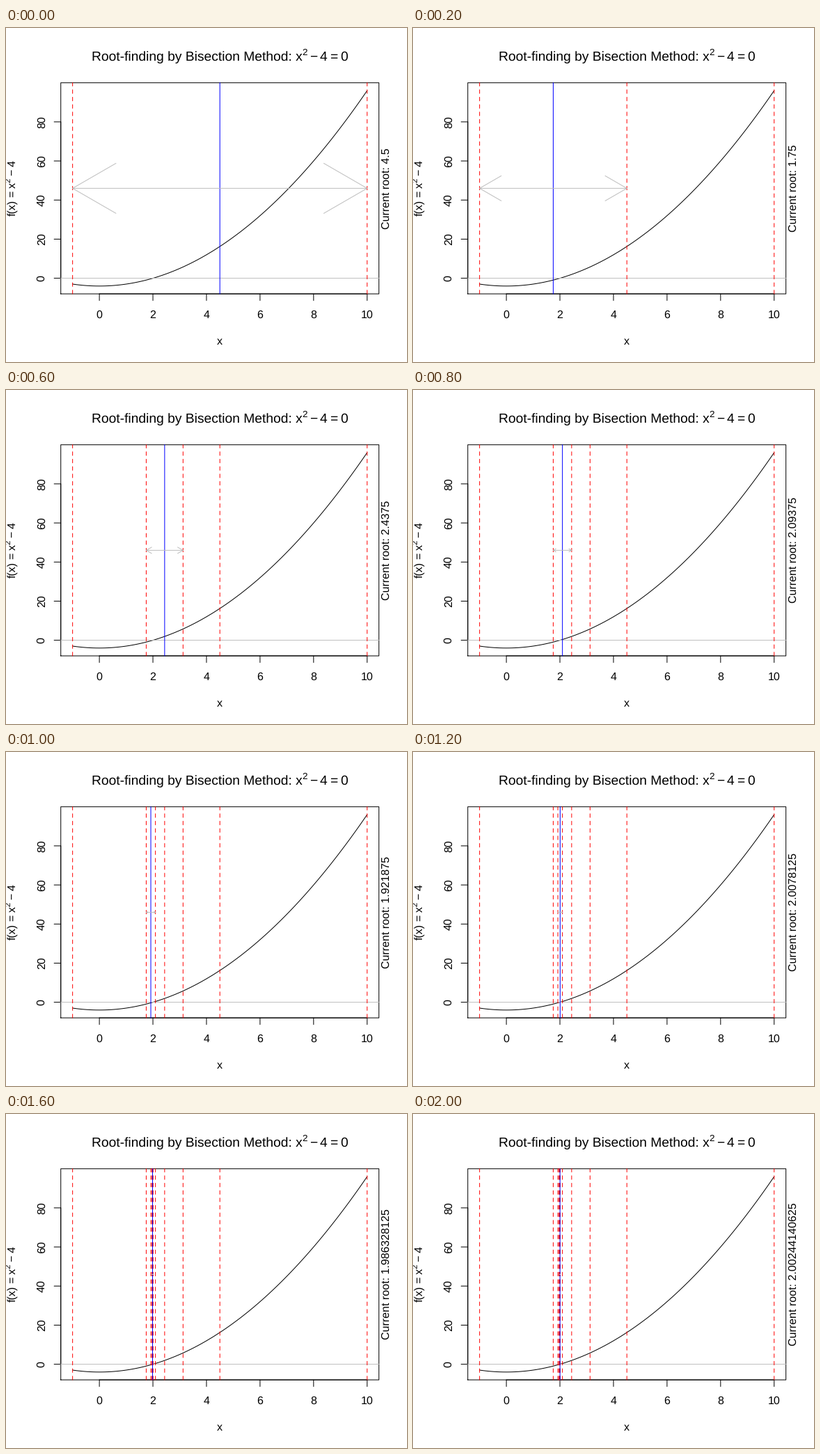
A matplotlib script that plays this animation: 576x480 px, repeating every 2200 ms.

```python
import numpy as np
import matplotlib.pyplot as plt
from matplotlib.animation import FuncAnimation
from matplotlib.collections import LineCollection

plt.rcParams["font.family"] = "Liberation Sans"
plt.rcParams["text.hinting"] = "no_hinting"

W, H, DPI = 576, 480, 96
PT = 72 / DPI                      # points per pixel
LINE = 19.2                        # height of one margin line
LEFT, RIGHT = 4.1 * LINE, W - 2.1 * LINE
TOP, BOTTOM = 4.1 * LINE, H - 5.1 * LINE
MID_X, MID_Y = (LEFT + RIGHT) / 2, (TOP + BOTTOM) / 2
FONT = 16
GRAY = "#BEBEBE"
LO, HI, STEPS = -1.0, 10.0, 11

fig = plt.figure(figsize=(W / DPI, H / DPI), dpi=DPI, facecolor="white")
ax = fig.add_axes([0, 0, 1, 1])
ax.set_xlim(0, W)
ax.set_ylim(H, 0)
ax.axis("off")


def f(x):
    return x ** 2 - 4


def px(x):
    return LEFT + (x + 1.44) * (RIGHT - LEFT) / 11.88


def py(y):
    return BOTTOM - (y + 8) * (BOTTOM - TOP) / 108


def stroke(xs, ys, color="black", z=2):
    line, = ax.plot(xs, ys, color=color, lw=PT, zorder=z, snap=False,
                    solid_capstyle="round", solid_joinstyle="round")
    return line


def write(x, y, s, size=FONT, angle=0):
    return ax.text(x, y, s, fontsize=size * PT, rotation=angle, ha="left",
                   va="baseline", rotation_mode="anchor", zorder=6)


def number_width(s):
    """Advance of a number in em."""
    return sum(0.278 if c == "." else 0.556 for c in s)


def formula(runs, size, base, upright):
    """Centre runs of (text, advance in em, gap before in px)."""
    total = sum(adv * size + gap for _, adv, gap in runs)
    pos = -total / 2
    for s, adv, gap in runs:
        pos += gap
        raised = s == "2"
        lift = 0.42 * size if raised else 0
        glyph = size * 0.7 if raised else size
        at = pos - (0.0175 * size if s in "=\u2212" else 0)
        if upright:
            write(MID_X + at, base - lift, s, glyph)
        else:
            write(base - lift, MID_Y - at, s, glyph, 90)
        pos += adv * size


def draw_plot():
    xs = np.linspace(LO, HI, 101)
    stroke(px(xs), py(f(xs)))
    stroke([LEFT, RIGHT, RIGHT, LEFT, LEFT], [BOTTOM, BOTTOM, TOP, TOP, BOTTOM])

    stroke([px(0), px(10)], [BOTTOM, BOTTOM])
    for v in range(0, 11, 2):
        s = str(v)
        stroke([px(v)] * 2, [BOTTOM, BOTTOM + LINE / 2])
        write(px(v) - number_width(s) * FONT / 2, BOTTOM + 1.8 * LINE, s)

    stroke([LEFT, LEFT], [py(0), py(80)])
    for v in range(0, 81, 20):
        s = str(v)
        stroke([LEFT, LEFT - LINE / 2], [py(v)] * 2)
        write(LEFT - 1.2 * LINE, py(v) + number_width(s) * FONT / 2, s, angle=90)

    stroke([LEFT, RIGHT], [py(0)] * 2, GRAY)
    write(MID_X - FONT / 4, BOTTOM + 3.8 * LINE, "x")

    thin, thick = FONT * 4 / 18, FONT * 5 / 18
    power = [("2", 0.389, 0), ("\u2212", 0.549, thin), ("4", 0.556, thin)]
    formula([("Root-finding by Bisection Method: x", 15.729, 0)] + power
            + [("=", 0.549, thick), ("0", 0.556, thick)], 1.2 * FONT, 47, True)
    formula([("f(x)", 1.444, 0), ("=", 0.549, thick), ("x", 0.5, thick)] + power,
            FONT, 13.6, False)


def bisect():
    """List the (low, high, middle, all ends so far) of every step."""
    a, b = LO, HI
    ends, out = [a, b], []
    for _ in range(STEPS):
        m = (a + b) / 2
        out.append((a, b, m, list(ends)))
        ends.append(m)
        if f(a) * f(m) < 0:
            b = m
        else:
            a = m
    return out


draw_plot()
steps = bisect()

dash = 16 / 3
bounds = LineCollection([], colors="red", linewidths=PT, zorder=3,
                        linestyles=[(0, (dash, dash))], capstyle="round")
bounds.set_snap(False)
ax.add_collection(bounds, autolim=False)
root = stroke([], [], "blue", 4)
arrow = stroke([], [], GRAY, 5)
label = write(RIGHT + 0.8 * LINE, MID_Y, "", angle=90)


def update(i):
    a, b, m, ends = steps[i]
    bounds.set_segments([[(px(e), BOTTOM), (px(e), TOP)] for e in ends])
    root.set_data([px(m)] * 2, [BOTTOM, TOP])

    l, r = px(a), px(b)
    head = 0.17 * (r - l)
    dx, dy = head * np.cos(np.pi / 6), head / 2
    arrow.set_data(
        [l + dx, l, l + dx, np.nan, l, r, np.nan, r - dx, r, r - dx],
        [MID_Y - dy, MID_Y, MID_Y + dy, np.nan, MID_Y, MID_Y, np.nan,
         MID_Y - dy, MID_Y, MID_Y + dy])

    value = str(m)
    label.set_text("Current root: " + value)
    label.set_y(MID_Y + (5.891 + number_width(value)) * FONT / 2)
    return bounds, root, arrow, label


anim = FuncAnimation(fig, update, frames=STEPS, interval=200, repeat=True,
                     repeat_delay=0, init_func=lambda: update(0), blit=False)
plt.show()
```
